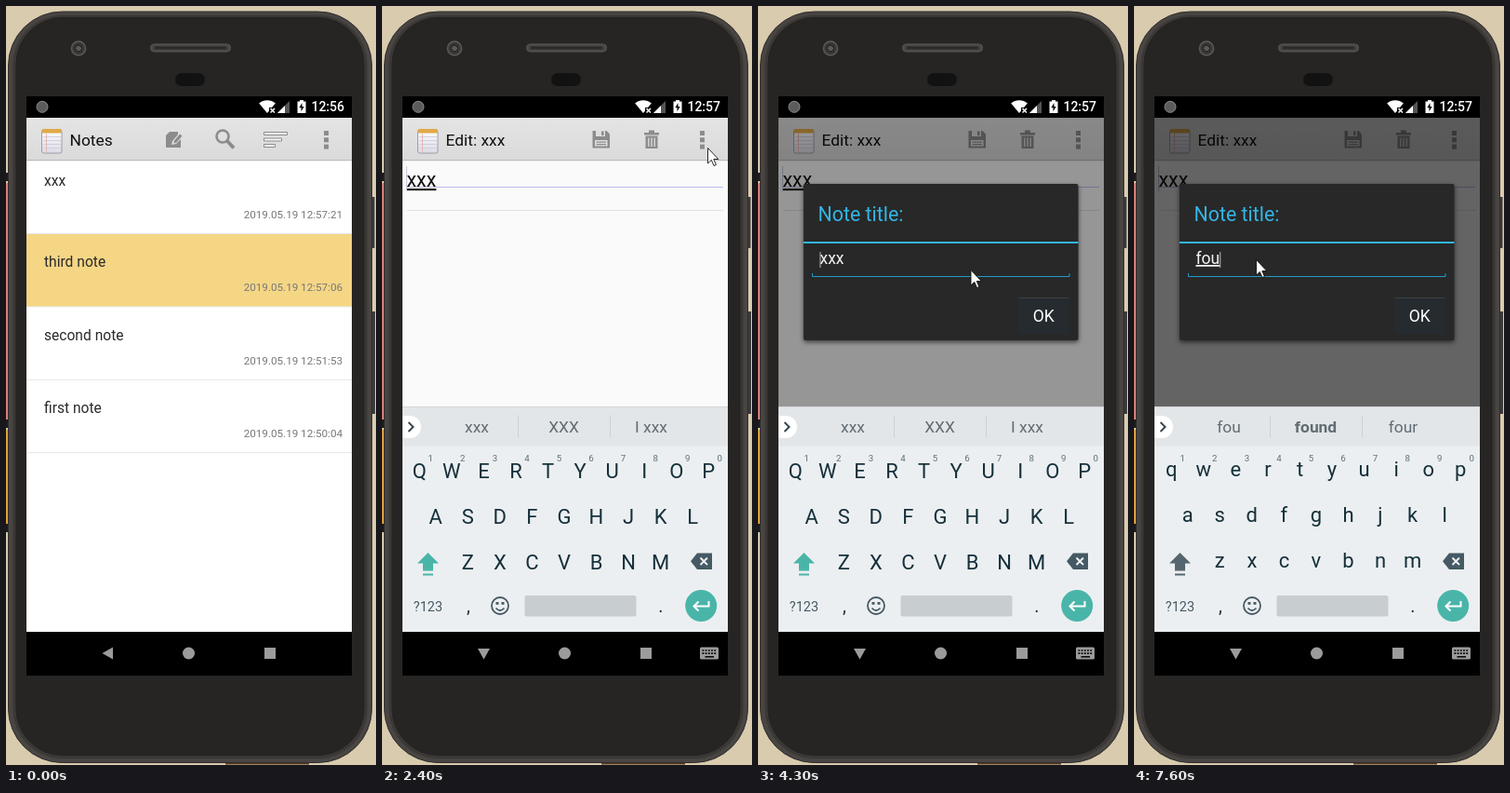
An HTML page that plays this animation: 398 px wide and 815 px high, repeating every 8 s.

```html
<!DOCTYPE html>
<html lang="en">
<head>
<meta charset="utf-8">
<title>Notes</title>
<style>
html, body { margin: 0; width: 100%; height: 100%; overflow: hidden; background: #d9cbae; }
svg { display: block; width: 398px; height: 815px; font-family: Roboto, sans-serif; }
text { white-space: pre; }
.mid { text-anchor: middle; }
.end { text-anchor: end; }
.shadow { filter: drop-shadow(0 2px 2.500px rgba(0, 0, 0, .6)); }
</style>
</head>
<body>
<svg id="stage" viewBox="0 0 398 815" xmlns="http://www.w3.org/2000/svg">
  <defs>
    <linearGradient id="barFill" x2="0" y2="1">
      <stop stop-color="#e4e4e4"/><stop offset="1" stop-color="#dadada"/>
    </linearGradient>
    <linearGradient id="paper" x2="0" y2="1">
      <stop stop-color="#fdfdff"/><stop offset="1" stop-color="#dcdbe6"/>
    </linearGradient>
    <clipPath id="screen"><rect x="22" y="120" width="350" height="552"/></clipPath>
  </defs>

  <g id="desk">
    <path d="M0 190h3v255h-3z" fill="#d9827a"/>
    <path d="M0 455h3v102h-3z" fill="#e0a23c"/>
    <path d="M0 179h4v9h-4zM0 444h4v9h-4zM0 556h4v9h-4z" fill="#1d1c1c"/>
    <path d="M236 813.500h90" stroke="#5a3a22" stroke-width="2"/>
  </g>

  <g id="phone">
    <path d="M392 205h4.500v55H392zM392 328h5v110h-5z" fill="#3b3a39"/>
    <rect x="2.500" y="6" width="391" height="806.500" rx="58" fill="#484543" stroke="#2f2d2c"/>
    <rect x="7" y="9.500" width="382" height="799" rx="54" fill="#3a3735" stroke="#454240"/>
    <rect x="11" y="12.500" width="374" height="792" rx="50" fill="#262524" stroke="#232221"/>
    <circle cx="78" cy="45.500" r="7.500" fill="#383736" stroke="#5c5b5a" stroke-width="1.600"/>
    <circle cx="78" cy="45.500" r="3.500" fill="#57585b" stroke="#1b1b1b"/>
    <rect x="155.500" y="41" width="86" height="8" rx="4" fill="#464544" stroke="#5c5b5a"/>
    <path d="M160 45h77" stroke="#2b2a2a" stroke-width="3"/>
    <rect x="182" y="72" width="32" height="14" rx="7" fill="#121213"/>
    <rect x="22" y="97" width="350" height="622"/>
  </g>

  <g id="status" fill="#fff">
    <circle cx="39" cy="108.300" r="6" fill="#5c5c5c" stroke="#8c8c8c"/>
    <path d="M281 115l-8.800-10.600a13.500 13.500 0 0 1 17.600 0z"/>
    <path d="M283 109h8v7h-8z" fill="#000"/>
    <path d="M284.500 110l4.500 4.500m0-4.500l-4.500 4.500" stroke="#fff" stroke-width="1.500"/>
    <path d="M292 115l13-13v13z" fill="#555"/>
    <path d="M292 115l8-8v8z"/>
    <path d="M313.500 102.500h2.500v-1.500h4v1.500h2.500v12.500h-9z"/>
    <path d="M318.500 104l-3.200 5.200h2.200v4l3.200-5.200h-2.200z" fill="#000"/>
    <text id="clock" x="364" y="113" class="end" font-size="14" font-weight="500">12:56</text>
  </g>

  <g clip-path="url(#screen)">
    <g id="list">
      <rect x="22" y="120" width="350" height="552" fill="#fff"/>
      <rect x="22" y="245" width="350" height="78" fill="#f5d685"/>
    </g>
    <rect id="listDim" x="22" y="120" width="350" height="552" opacity="0"/>
    <g id="edit">
      <rect x="22" y="120" width="350" height="600" fill="#fafafa"/>
      <path id="rule1" d="M27 194.500h340" stroke="#bdbdf0"/>
      <path id="rule2" d="M27 219.500h340" stroke="#e0e1e4"/>
      <text id="note" x="26.500" y="194" font-size="21.400" fill="#111">xxx</text>
      <path id="noteCaret" d="M26.500 172v27" stroke="#c6c6dc"/>
    </g>
    <rect id="press" x="317" y="121" width="55" height="45" fill="#33b5e5" opacity="0"/>
    <g id="menu" class="shadow">
      <rect x="173" y="167" width="191" height="140.500" rx="1" fill="#efefef"/>
      <path d="M173 213.500h191M173 261h191" stroke="#d8d8d8"/>
    </g>
    <rect id="dim" x="22" y="120" width="350" height="552" opacity="0"/>
    <g id="dialog">
      <rect class="shadow" x="49" y="191" width="295.500" height="168" rx="2" fill="#282828"/>
      <rect x="49" y="253" width="295.500" height="2" fill="#33b5e5"/>
      <path d="M58.500 287v3.500h276.500v-3.500" fill="none" stroke="#2499cb"/>
      <rect x="280.500" y="313" width="54" height="39" fill="#252b2f"/>
      <path d="M280.500 313.500h54" stroke="#3c4246"/>
      <text id="input" x="66.500" y="277" font-size="17.500" fill="#f3f3f3"></text>
      <path id="inputCaret" d="M0 264v17" stroke="#b8b8b8"/>
      <path id="handle" d="M92.200 280.700l7 7a10 10 0 1 1-14 0z" fill="#33b5e5"/>
    </g>
    <g id="keyboard">
      <rect x="22" y="430" width="350" height="242" fill="#eceff1"/>
      <rect x="22" y="430" width="350" height="42.500" fill="#e3e6e9"/>
      <path d="M22 430.500h350" stroke="#d3d6d9"/>
      <path d="M146.500 440v23M245.500 440v23" stroke="#cbd0d3"/>
      <path d="M22 440h8a11.500 11.500 0 0 1 0 24h-8z" fill="#fff"/>
      <path d="M28.500 447l5 5-5 5" fill="none" stroke="#37474f" stroke-width="2"/>
      <g id="shift">
        <path d="M49.500 587l11.500 11.500h-6v8h-11v-8h-6z"/>
        <path d="M44 609.500h11v2h-11z"/>
      </g>
      <path d="M339 587.500h16v17.500h-16l-7-8.700z" fill="#455a64"/>
      <path d="M342.500 592.500l7.500 7.500m0-7.500l-7.500 7.500" stroke="#eceff1" stroke-width="2"/>
      <g fill="none" stroke="#455a64" stroke-width="1.800">
        <circle cx="127" cy="644" r="9"/>
        <path d="M122.500 646.500q4.500 5 9 0"/>
      </g>
      <path d="M122.500 640h3v2.800h-3zM128.500 640h3v2.800h-3z" fill="#455a64"/>
      <rect x="153.500" y="633" width="120" height="22.500" rx="2" fill="#c8cdd0"/>
      <circle cx="343.200" cy="644" r="17" fill="#49b5a9"/>
      <path d="M351.500 639v5.500h-16m5-5l-5 5 5 5" fill="none" stroke="#fff" stroke-width="2"/>
      <g id="upper"></g>
      <g id="lower" transform="translate(0 -2)"></g>
    </g>
  </g>

  <g id="nav" fill="#9b9b9b">
    <path id="back" d="M103.500 695l11.500-6.500v13z"/>
    <path id="hide" d="M103 690h13l-6.500 11.500z"/>
    <circle cx="196.500" cy="695" r="6.500"/>
    <rect x="278" y="689" width="12" height="12"/>
    <g id="switcher">
      <rect x="342" y="688.500" width="20" height="13" rx="1.500"/>
      <path d="M344.500 692h15.500M344.500 695.200h15.500" stroke="#000" stroke-width="1.700" stroke-dasharray="1.800 1.400"/>
      <path d="M347.500 698.800h9.500" stroke="#000" stroke-width="1.500"/>
    </g>
  </g>

  <path id="pointer" d="M.5.500v16.500l3.800-3.600 2.700 6.100 2.400-1-2.600-6h5z" fill="#fff" stroke="#111" stroke-width=".9"/>
</svg>
<script>
const LOOP = 8000, STEP = 100;
const $ = id => document.getElementById(id);
const clamp = v => Math.min(1, Math.max(0, v));
const progress = (t, from, span) => clamp((t - from) / span);
const easeOut = (p, power = 2) => 1 - (1 - p) ** power;
const add = (parent, markup) => parent.insertAdjacentHTML('beforeend', markup);
const show = (id, on) => $(id).setAttribute('opacity', +on);

function label(parent, x, y, text, size, fill, cls = '') {
  add(parent, `<text x="${x}" y="${y}" font-size="${size}" fill="${fill}" class="${cls}">${text}</text>`);
  return parent.lastElementChild;
}

const GLYPHS = {
  compose: `<path d="M172 139l4-4h9v3l-6 7-1 4 5-1 5-5v9h-16z"/><path d="M181 144.500l6-7 2.500 2-6 7-3 1z"/>`,
  search: `<circle cx="233" cy="140" r="6.500" fill="none" stroke="#8c8c8c" stroke-width="2.600"/>
    <path d="M238 145l7 7.500" stroke="#8c8c8c" stroke-width="4"/>`,
  sort: `<path d="M277.500 135.500h25v3h-25zM277.500 142h19v3h-19zM277.500 148.500h12v3h-12z" fill="#f4f4f4" stroke="#8c8c8c"/>`,
  save: `<path d="M226.500 134h15l3.500 3.500v15h-18.500z"/><path d="M230 134h10v6h-10zM229 144h13.500v6.500h-13.500z" fill="#dedede"/>
    <path d="M236 134.500h2.500v4.500h-2.500zM230.500 145.500h10.500v1.300h-10.500zM230.500 148h10.500v1.300h-10.500z"/>`,
  trash: `<path d="M282 136h5v-2.500h6v2.500h5v2.500h-16zM283.500 139.500h13v13.500h-13z"/>
    <path d="M286.800 141.500v9.500M290 141.500v9.500M293.200 141.500v9.500" stroke="#dedede" stroke-width="1.300"/>`,
  more: [134, 141.3, 148.600].map(y => `<rect x="342" y="${y}" width="5" height="5"/>`).join('')
};

function actionBar(parent, title, icons) {
  add(parent, `<rect x="22" y="120" width="350" height="46" fill="url(#barFill)"/>
    <path d="M22 165.700h350" stroke="#b4b4b4"/>
    <rect x="38.500" y="133" width="21.500" height="25" rx="2" fill="url(#paper)" stroke="#a09da4"/>
    <rect x="38.500" y="132" width="21.500" height="4.500" rx="1.500" fill="#e0aa48"/>
    <path d="M40 140.500h19M40 144.500h19M40 148.500h19M40 152.500h19" stroke="#d2cfde"/>
    <path d="M43.500 137v20" stroke="#e8b8b4"/>
    <g fill="#8c8c8c">${icons.map(name => GLYPHS[name]).join('')}</g>`);
  label(parent, 68.500, 150, title, 17.400, '#111');
}

const notes = [
  ['xxx', 192.500, '12:57:21'],
  ['third note', 280.300, '12:57:06'],
  ['second note', 358.700, '12:51:53'],
  ['first note', 437.100, '12:50:04']
];
notes.forEach(([title, y, time], i) => {
  add($('list'), `<path d="M22 ${244.5 + i * 78.400}h350" stroke="#e6e6e6"/>`);
  label($('list'), 41, y, title, 15.600, '#2a2a2a');
  label($('list'), 362, 228 + i * 78.400, '2019.05.19 ' + time, 11.650, '#777', 'end');
});
actionBar($('list'), 'Notes', ['compose', 'search', 'sort', 'more']);
actionBar($('edit'), 'Edit: xxx', ['save', 'trash', 'more']);

['Color changes', 'Output', 'Edit title'].forEach((item, i) =>
  label($('menu'), 188.700, 197 + i * 47, item, 17.400, '#1a1a1a'));
label($('dialog'), 64.500, 231, 'Note title:', 21.400, '#33b5e5');
label($('dialog'), 307.200, 339, 'OK', 17.500, '#fff', 'mid');

const PITCH = 34.550;
[['qwertyuiop', 40.300], ['asdfghjkl', 57.700], ['zxcvbnm', 92.300]].forEach(([keys, x0], row) =>
  [...keys].forEach((key, i) => {
    const x = x0 + i * PITCH, y = 507 + row * 49;
    label($('lower'), x, y, key, 22, '#14303a', 'mid');
    label($('upper'), x, y, key.toUpperCase(), 22, '#14303a', 'mid');
    if (!row) label($('keyboard'), x + 12, 488.500, (i + 1) % 10, 9.700, '#5d7078', 'mid');
  }));
label($('keyboard'), 49.500, 649.500, '?123', 14.500, '#455a64', 'mid');
label($('keyboard'), 93, 651, ',', 20, '#263238', 'mid');
label($('keyboard'), 300, 651, '.', 20, '#263238', 'mid');
const hints = [102, 195.500, 289.500].map(x => label($('keyboard'), x, 458, '', 17.400, '#606c72', 'mid'));

// time, input text, three suggestions
const typing = [
  [0, 'xxx', 'xxx', 'XXX', 'I xxx'],
  [6100, 'xx', 'xx', 'XX', 'xxx'],
  [6300, 'x', 'x', 'X', 'xx'],
  [6500, '', 'I', 'The', 'I’m'],
  [7000, 'f', 'f', 'for', 'fun'],
  [7200, 'fo', 'fo', 'foot', 'fun'],
  [7600, 'fou', 'fou', 'found', 'four']
];

// time, x, y of the mouse pointer
const path = [
  [200, 286, 230], [800, 208, 220], [2100, 208, 220], [2200, 350, 152],
  [2800, 350, 152], [3300, 296, 285], [4100, 296, 285], [4500, 161, 281],
  [4800, 128, 271], [5500, 128, 271], [5600, 131, 272]
];

function pointerAt(t) {
  const next = path.findIndex(p => p[0] > t);
  if (next < 0) return path[path.length - 1].slice(1);
  const [t0, x0, y0] = path[Math.max(0, next - 1)], [t1, x1, y1] = path[next];
  const p = progress(t, t0, t1 - t0), e = p * p * (3 - 2 * p);
  return [x0 + (x1 - x0) * e, y0 + (y1 - y0) * e];
}

function drawEditor(t) {
  const opening = progress(t, 1200, 450);
  const focused = t >= 1900;
  $('edit').setAttribute('opacity', easeOut(progress(t, 1200, 356)));
  $('edit').setAttribute('transform', `translate(0 ${50 * (1 - opening) ** 1.670})`);
  $('listDim').setAttribute('opacity', .18 * opening);
  $('rule1').setAttribute('stroke', focused ? '#bdbdf0' : '#f2f2f5');
  $('rule2').setAttribute('stroke', focused ? '#e0e1e4' : '#cdd0d4');
  $('note').setAttribute('text-decoration', focused && t < 4400 ? 'underline' : 'none');
  show('noteCaret', t < 2000 || t >= 2400);
}

function drawKeyboard(t, words) {
  const p = easeOut(progress(t, 1700, 400));
  $('keyboard').setAttribute('opacity', p);
  $('keyboard').setAttribute('transform', `translate(0 ${24 * (1 - p)})`);
  const caps = t < 5100 || (t >= 6500 && t < 7000);
  show('upper', caps);
  show('lower', !caps);
  $('shift').setAttribute('fill', caps ? '#49b5a9' : '#56666e');
  hints.forEach((hint, i) => hint.textContent = words[i]);
  hints[1].setAttribute('font-weight', t >= 7000 ? 700 : 400);
  const open = t >= 1900;
  show('back', !open);
  show('hide', open);
  show('switcher', open);
}

function drawDialog(t, text) {
  const a = easeOut(progress(t, 3800, 400)), s = .92 + .08 * a;
  $('dialog').setAttribute('opacity', a);
  $('dialog').setAttribute('transform', `translate(196.700 275) scale(${s}) translate(-196.700 -275)`);
  $('dim').setAttribute('opacity', .6 * progress(t, 3900, 600));
  const input = $('input');
  input.textContent = text;
  input.setAttribute('text-decoration', t >= 5000 ? 'underline' : 'none');
  const x = 67 + (t >= 5000 && text ? input.getComputedTextLength() : 0);
  $('inputCaret').setAttribute('transform', `translate(${x} 0)`);
  show('inputCaret', t < 4700 || (t >= 5000 && t < 5600) || t >= 6100);
  show('handle', t >= 5100 && t < 6100);
}

function draw(t) {
  const [, text, ...words] = typing.filter(row => row[0] <= t).pop();
  $('clock').textContent = t < 500 ? '12:56' : '12:57';
  drawEditor(t);
  drawKeyboard(t, words);
  drawDialog(t, text);
  $('press').setAttribute('opacity', t >= 2600 && t < 2800 ? .35 : 0);
  $('menu').setAttribute('opacity', progress(t, 2600, 300) * (1 - progress(t, 3600, 300)));
  const [x, y] = pointerAt(t);
  $('pointer').setAttribute('transform', `translate(${x} ${y})`);
  show('pointer', t >= 200 && !(t >= 2100 && t < 2200));
}

const start = performance.now();
function tick() {
  const t = (performance.now() - start) % LOOP;
  draw(Math.floor(t / STEP) * STEP);
  requestAnimationFrame(tick);
}
tick();
</script>
</body>
</html>
```
